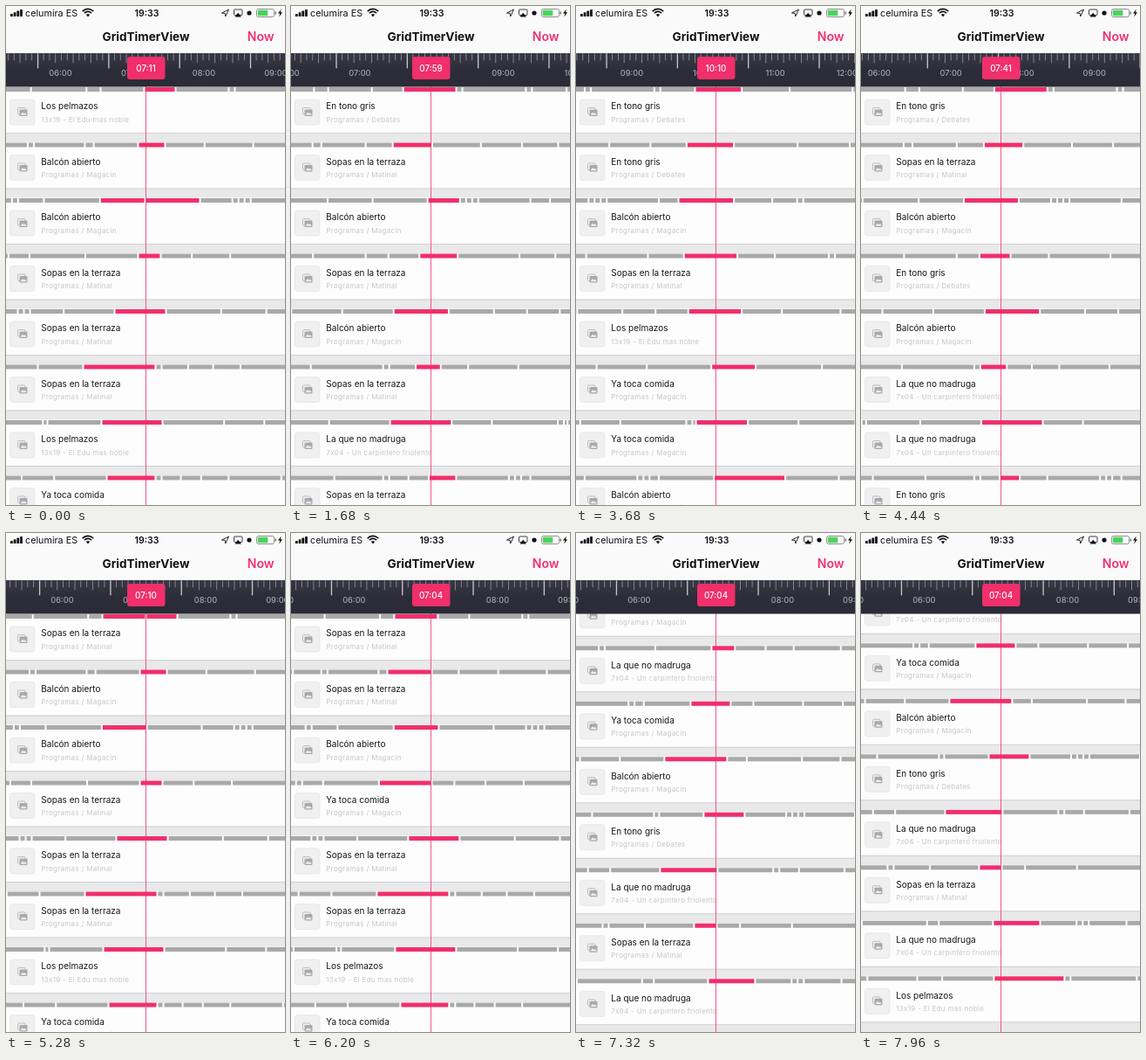
Recreate the animation shown at these times as an HTML page with a canvas. Size 320 by 571 pixels, loop 8 s.

```html
<!DOCTYPE html>
<html lang="es">
<head>
<meta charset="utf-8">
<title>GridTimerView</title>
<style>
  html, body { margin: 0; width: 100%; height: 100%; overflow: hidden; background: #fff; }
  canvas { display: block; width: 320px; height: 571px; }
</style>
</head>
<body>
<canvas id="stage"></canvas>
<script>
const W = 320, H = 571, LOOP = 8000;
const PINK = '#f02f6b', MID = 160.5, START = 431.5;
const HOUR = 82.3, PX = HOUR / 60;  // pixels per hour and per minute
const TOP = 92.5, PITCH = 63.5;     // first row and distance between rows

const canvas = document.getElementById('stage');
const g = canvas.getContext('2d');
const dpr = window.devicePixelRatio || 1;
canvas.width = W * dpr;
canvas.height = H * dpr;

const SHOWS = {
  E: ['Balcón abierto', 'Programas / Magacín'],
  T: ['Sopas en la terraza', 'Programas / Matinal'],
  S: ['Los pelmazos', '13x19 - El Edu mas noble'],
  Y: ['Ya toca comida', 'Programas / Magacín'],
  R: ['En tono gris', 'Programas / Debates'],
  L: ['La que no madruga', '7x04 - Un carpintero friolento'],
};

let seed = 7;
function random() {
  seed = (seed * 16807) % 2147483647;
  return seed / 2147483647;
}

// A row is filled with random segments around its key shows.
// Each key has two letters (the show before it and itself) and two ends.
function buildRow(letters, ...ends) {
  const row = [];
  let x = -60;
  const add = (show, to) => {
    row.push({ show, from: x, to });
    x = to;
  };
  const fill = end => {
    while (x < end) {
      const len = random() < 0.25 ? 7 : 22 + 55 * random();
      add('ETSYRL'[Math.floor(random() * 6)], Math.min(end, x + len));
    }
  };
  for (let k = 0; k < ends.length; k += 2) {
    fill(ends[k] - 50 - 15 * random());
    add(letters[k], ends[k]);
    add(letters[k + 1], ends[k + 1]);
  }
  fill(700);
  return row;
}

const rows = [
  ['TSRE', 159, 195, 436, 491], ['TERY', 152, 183, 427, 500],
  ['EEES', 160, 223, 427, 471], ['YTTT', 152, 178, 431, 474],
  ['LTSY', 125, 184, 436, 482], ['RTYY', 89, 172, 452, 528],
  ['ESYY', 110, 180, 443, 501], ['TYRE', 116, 172, 404, 486],
  ['TL', 123, 171], ['ER', 120, 189], ['LS', 145, 179], ['TY', 130, 200],
  ['SL', 146, 173], ['RY', 122, 168], ['YE', 92, 164], ['TR', 137, 184],
  ['EL', 87, 153], ['ST', 126, 152], ['YL', 142, 196], ['RS', 143, 224],
].map(keys => buildRow(...keys));

const decay = (t, tau) => Math.exp(-t / tau);

// Minute of the day under the centre line: two flicks, each a drag and a glide
function minuteAt(t) {
  if (t < 1440) return START + 0.4 * (1 - decay(t, 120));
  if (t < 1680) return START + 0.4 + 47.6 * ((t - 1440) / 240) ** 2;
  if (t < 3450) return 672.5 - 193 * decay(t - 1680, 466);
  if (t < 3680) return 668.2 - 57.8 * ((t - 3450) / 230) ** 1.6;
  return 423.3 + 187.1 * decay(Math.min(t, 6200) - 3680, 481);
}

function scrollAt(t) {
  if (t < 6560) return 0;
  if (t < 6800) return 269 * ((t - 6560) / 240) ** 1.8;
  return 269 + 529.5 * (1 - decay(t - 6800, 262));
}

function rect(x, y, w, h, color) {
  g.fillStyle = color;
  g.fillRect(x, y, w, h);
}

function rounded(x, y, w, h, r, color, stroke) {
  g.beginPath();
  g.roundRect(x, y, w, h, r);
  if (color) { g.fillStyle = color; g.fill(); }
  if (stroke) { g.strokeStyle = stroke; g.lineWidth = 0.8; g.stroke(); }
}

function poly(points, color) {
  g.beginPath();
  points.forEach(([x, y]) => g.lineTo(x, y));
  g.closePath();
  g.fillStyle = color;
  g.fill();
}

function text(s, x, y, size, color, weight = 400, align = 'left', spacing = 0) {
  g.font = `${weight} ${size}px Inter, sans-serif`;
  g.letterSpacing = spacing + 'px';
  g.textAlign = align;
  g.fillStyle = color;
  g.fillText(s, x, y);
}

function clock(min) {
  const pad = n => String(Math.floor(n)).padStart(2, '0');
  return pad(min / 60) + ':' + pad(min % 60);
}

function drawIcon(y) {
  rounded(4.5, y + 14.5, 28.5, 29, 3, '#f0f0f1', '#e6e6e8');
  rounded(13.5, y + 24, 8.5, 7.5, 1, null, '#b2b2b5');
  rounded(15.5, y + 26, 9, 7.5, 1, '#a9a9ac');
  poly([[16.5, y + 32.3], [19, y + 29], [20.6, y + 30.8], [21.8, y + 29.6], [23.7, y + 32.3]], '#f0f0f1');
}

function drawRow(row, y, shift) {
  const centre = MID - shift;
  rect(0, y, W, 52.5, '#fdfdfe');
  rect(0, y + 52.5, W, 1, '#d2d2d4');

  for (const { from, to } of row) {
    const active = from < centre + 1 && to > centre - 1;
    rect(from + shift + 0.5, y + 0.5, Math.max(0, to - from - 2), 5, active ? PINK : '#a9a9a9');
  }

  drawIcon(y);
  const [title, note] = SHOWS[row.find(s => s.to > centre).show];
  text(title, 40.3, y + 25.8, 10, '#161616');
  g.save();
  g.beginPath();
  g.rect(0, y, 161, 53);
  g.clip();
  text(note, 40.3, y + 40, 8, '#c6c6c9', 400, 'left', 0.3);
  g.restore();
}

function drawRuler(min) {
  const shade = g.createLinearGradient(0, 54, 0, 92);
  shade.addColorStop(0, '#383944');
  shade.addColorStop(0.5, '#2c2d38');
  shade.addColorStop(1, '#2a2b36');
  g.fillStyle = shade;
  g.fillRect(0, 54, W, 38.5);

  for (let h = 3; h < 16; h++) {
    const x = MID + (60 * h - min) * PX;
    const tick = x - 20 - h;
    for (let i = 0; i < 12; i++) {
      const len = i === 0 ? 17 : i % 3 === 0 ? 11 : 8;
      rect(tick + i * (HOUR - 1) / 12 - 0.5, 54.3, i ? 0.9 : 1.3, len, i ? '#8b8c95' : '#c9c9ce');
    }
    text(clock(60 * h), x, 79.9, 9.2, '#a3a4ad', 500, 'center');
  }
}

function drawStatus() {
  const ink = '#111';
  rect(0, 0, W, 54, '#fafafb');
  for (let i = 0; i < 4; i++) rounded(5 + i * 3.7, 9 - i * 1.7, 2.8, 3 + i * 1.7, 0.6, ink);
  text('celumira ES', 22, 11.8, 10.8, ink);

  g.strokeStyle = ink;
  g.lineWidth = 1.6;
  for (const r of [8.6, 5.6]) {
    g.beginPath();
    g.arc(94, 12, r, -Math.PI * 0.76, -Math.PI * 0.24);
    g.stroke();
  }
  poly([[94, 12.4], [91.8, 9.8], [94, 9], [96.2, 9.8]], ink);

  text('19:33', 161.5, 11.8, 10.6, ink, 600, 'center');

  poly([[247.5, 8], [255.5, 4], [251.7, 12], [251.2, 8.4]], 'transparent');
  g.lineWidth = 0.9;
  g.stroke();
  rounded(261.5, 4, 9.5, 6.5, 1, null, ink);
  poly([[266.2, 7.8], [270, 12.4], [262.4, 12.4]], ink);
  rounded(276.4, 5.4, 5.2, 5.2, 2.6, ink);
  rounded(287.5, 3.5, 20, 9, 2, null, '#777');
  rounded(288.8, 4.8, 11.5, 6.4, 1, '#4cd25c');
  rounded(308.5, 6.3, 1.5, 3.4, 0.7, '#777');
  poly([[315.8, 3.6], [312, 8.6], [314.2, 8.6], [313.2, 12.4], [317, 7.3], [314.8, 7.3]], ink);

  text('GridTimerView', 160.5, 40.2, 13.6, '#111', 700, 'center');
  text('Now', 307.5, 40.2, 14, PINK, 600, 'right');
}

function draw(t) {
  const min = minuteAt(t), scroll = scrollAt(t);
  const shift = (START - min) * PX;

  g.setTransform(dpr, 0, 0, dpr, 0, 0);
  rect(0, 0, W, H, '#e9e9ea');
  rows.forEach((row, i) => {
    const y = TOP + i * PITCH - scroll;
    if (y > 30 && y < H) drawRow(row, y, shift);
  });
  g.globalAlpha = 0.8;
  rect(MID - 0.5, 84, 1, H - 84, PINK);
  g.globalAlpha = 1;
  drawRuler(min);
  drawStatus();
  rounded(139, 58, 43.5, 26, 3, PINK);
  text(clock(min), MID, 74.8, 9.8, '#fff', 500, 'center');
}

let begin;
function frame(now) {
  begin ??= now;
  draw((now - begin) % LOOP);
  requestAnimationFrame(frame);
}
requestAnimationFrame(frame);
</script>
</body>
</html>
```
